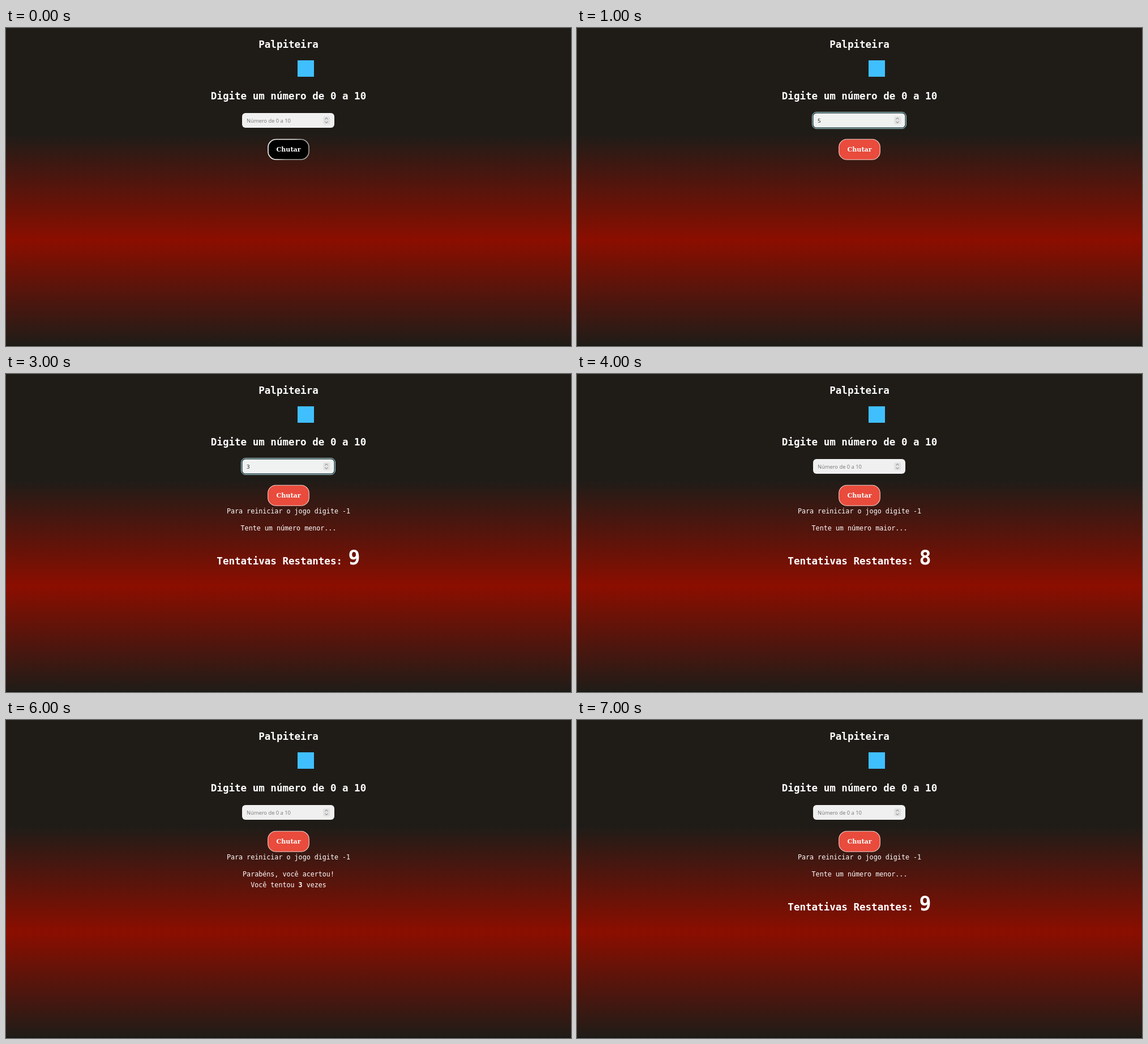
Animation, 998 px wide and 561 px high, one loop 8 s. Source, as an HTML page with a canvas:

```html
<!DOCTYPE html>
<html lang="pt-BR">
<head>
<meta charset="utf-8">
<title>Palpiteira</title>
<style>
html, body { margin: 0; width: 100%; height: 100%; overflow: hidden; background: #1f1c18; }
canvas { display: block; }
</style>
</head>
<body>
<canvas id="stage" width="998" height="561"></canvas>
<script>
const ctx = document.getElementById('stage').getContext('2d');
const W = 998, H = 561, CENTER = 499;
const MONO = '"DejaVu Sans Mono", monospace';
const SANS = '"Open Sans", "Noto Sans", sans-serif';
const SERIF = '"DejaVu Serif", "Noto Serif", serif';
const HEADING = `bold 17.55px ${MONO}`;
const BODY = `11.7px ${MONO}`;
const BODY_BOLD = `bold 11.7px ${MONO}`;

const LOWER = { hint: 'Tente um número menor...', left: 9 };
const HIGHER = { hint: 'Tente um número maior...', left: 8 };
const WON = { hint: 'Parabéns, você acertou!', tries: 3 };

// One entry per second of the game.
const STEP = 1000;
const steps = [
  { idle: true },
  { value: '5', focus: true },
  { result: LOWER },
  { value: '3', focus: true, result: LOWER },
  { result: HIGHER },
  { value: '4', result: HIGHER },
  { result: WON },
  { result: LOWER }
];

function text(str, x, y, font, color = '#fff', align = 'left') {
  ctx.font = font;
  ctx.fillStyle = color;
  ctx.textAlign = align;
  ctx.fillText(str, x, y);
}

const centered = (str, y, font) => text(str, CENTER, y, font, '#fff', 'center');

// Centres a line made of [string, font] runs.
function centeredRuns(runs, y) {
  const widths = runs.map(([str, font]) => {
    ctx.font = font;
    return ctx.measureText(str).width;
  });
  let x = CENTER - widths.reduce((a, b) => a + b) / 2;
  runs.forEach(([str, font], i) => {
    text(str, x, y, font);
    x += widths[i];
  });
}

function box(x, y, w, h, r, fill, stroke, line = 1) {
  ctx.beginPath();
  ctx.roundRect(x, y, w, h, r);
  if (fill) {
    ctx.fillStyle = fill;
    ctx.fill();
  }
  if (stroke) {
    ctx.strokeStyle = stroke;
    ctx.lineWidth = line;
    ctx.stroke();
  }
}

function chevron(x, y, dy) {
  ctx.beginPath();
  ctx.moveTo(x - 2.6, y);
  ctx.lineTo(x, y + dy);
  ctx.lineTo(x + 2.6, y);
  ctx.strokeStyle = '#6e6e6e';
  ctx.lineWidth = 1;
  ctx.stroke();
}

function drawBackground() {
  const g = ctx.createLinearGradient(0, 0, 0, H);
  g.addColorStop(0, '#1f1c18');
  g.addColorStop(1 / 3, '#1f1c18');
  g.addColorStop(2 / 3, '#8b0e00');
  g.addColorStop(1, '#1f1c18');
  ctx.fillStyle = g;
  ctx.fillRect(0, 0, W, H);
  ctx.fillStyle = '#100f0d';
  ctx.fillRect(0, H - 1, W, 1);
}

function drawInput({ value, focus }) {
  if (focus) {
    box(415.5, 148.5, 166, 29, 7.5, '#1c3d42', '#b4d0d2');
    box(417.5, 150.5, 162, 25, 5.5, '#f0f1f1');
  } else {
    box(417, 150, 163, 26, 6, '#f0f0f0');
  }
  if (value) text(value, 425, 166.5, `9.7px ${SANS}`, '#111');
  else text('Número de 0 a 10', 425, 166.5, `9.36px ${SANS}`, '#757575');
  box(560, 156, 12.5, 14, 3, '#e2e2e2');
  chevron(566, 161, -2.4);
  chevron(566, 165, 2.4);
}

function drawButton(idle) {
  if (idle) {
    const bevel = ctx.createLinearGradient(470, 190, 528, 238);
    bevel.addColorStop(0.45, '#f4f4f0');
    bevel.addColorStop(0.6, '#a9aaa5');
    box(463, 196.5, 72, 35.5, 14, '#000', bevel, 1.6);
  } else {
    box(462.7, 196.2, 72.6, 36, 14, '#e94b3c', '#f3d2cc', 1.1);
  }
  text('Chutar', CENTER, 217.7, `bold 11.1px ${SERIF}`, '#fff', 'center');
}

function drawResult({ hint, left, tries }) {
  centered('Para reiniciar o jogo digite -1', 245.5, BODY);
  centered(hint, 275.5, BODY);
  if (tries) {
    centeredRuns([['Você tentou ', BODY], [String(tries), BODY_BOLD], [' vezes', BODY]], 294.5);
  } else {
    centeredRuns([['Tentativas Restantes: ', HEADING], [String(left), `bold 35.1px ${MONO}`]], 336);
  }
}

function draw(now) {
  const step = steps[Math.floor(now / STEP) % steps.length];
  drawBackground();
  centered('Palpiteira', 35, HEADING);
  ctx.fillStyle = '#40bfff';
  ctx.fillRect(515, 57, 29, 29);
  centered('Digite um número de 0 a 10', 126, HEADING);
  drawInput(step);
  drawButton(step.idle);
  if (step.result) drawResult(step.result);
}

const start = performance.now();
function tick() {
  draw(performance.now() - start);
  requestAnimationFrame(tick);
}
tick();
</script>
</body>
</html>
```
